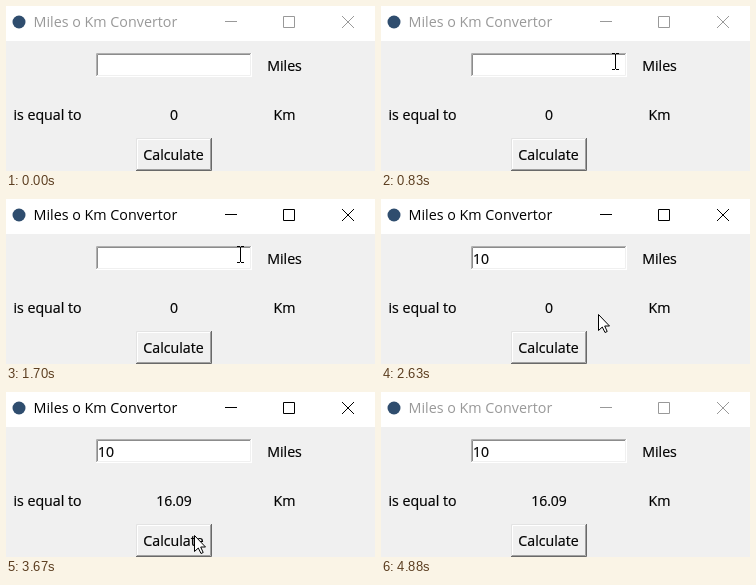
Animation, 369 px wide and 165 px high, one loop 4940 ms. Source, as an HTML page:

```html
<!DOCTYPE html>
<html lang="en">
<head>
<meta charset="utf-8">
<title>Miles to Km</title>
<style>
  html, body { margin: 0; width: 100%; height: 100%; overflow: hidden; background: #f0f0f0; }
  svg { display: block; width: 369px; height: 165px; }
  text { font: 14.2px "Open Sans", "Noto Sans", sans-serif; fill: #000; stroke: #000; stroke-width: .2px; white-space: pre; }
  #title { font-size: 14.3px; stroke: none; }
  .mid { text-anchor: middle; }
  .num { font-size: 14px; }
  .line { fill: none; stroke-width: 1; }
</style>
</head>
<body>
<svg viewBox="0 0 369 165">
  <rect width="369" height="165" fill="#f0f0f0"/>
  <rect width="369" height="35" fill="#fff"/>
  <circle cx="13" cy="16" r="6.5" fill="#2f4d6e"/>
  <text id="title" x="27.5" y="21">Miles o Km Convertor</text>
  <path id="controls" class="line" d="M219 15.5h12M277.5 10.5h11v11h-11zM336 10l12 12M348 10l-12 12"/>

  <rect x="90" y="47" width="156" height="24" fill="#fff"/>
  <g id="entryEdge"></g>
  <text id="entry" class="num" x="92" y="65"></text>
  <rect id="caret" y="49" width="2" height="20"/>

  <text class="mid" x="278.5" y="65">Miles</text>
  <text class="mid" x="41.5" y="114">is equal to</text>
  <text id="result" class="mid num" x="168" y="114"></text>
  <text class="mid" x="278.5" y="114">Km</text>

  <g id="raised"></g>
  <g id="sunken"></g>
  <text id="label" class="mid" x="167.5" y="154">Calculate</text>

  <path id="arrow" d="M.5 .5V16.5L4.3 13L7 18.5L9.2 17.5L6.7 12H11.5Z" fill="#fff" stroke="#000"/>
  <path id="beam" class="line" stroke="#000" d="M-3 -7.5h3M1 -7.5h3M.5 -7v15M-3 8.5h3M1 8.5h3"/>
</svg>
<script>
const LOOP = 4940;
const $ = id => document.getElementById(id);

// Two-pixel bevel: outer and inner colours for the top-left and bottom-right edges.
function bevel(id, x, y, w, h, topLeft, bottomRight) {
  const edge = (inset, color, corner) => {
    const l = x + inset + .5, t = y + inset + .5;
    const r = x + w - inset - .5, b = y + h - inset - .5;
    const d = corner === 'tl' ? `M${l} ${b}V${t}H${r}` : `M${l} ${b}H${r}V${t}`;
    return `<path class="line" stroke-linecap="square" stroke="${color}" d="${d}"/>`;
  };
  $(id).innerHTML = edge(0, topLeft[0], 'tl') + edge(0, bottomRight[0], 'br') +
                    edge(1, topLeft[1], 'tl') + edge(1, bottomRight[1], 'br');
}
const GLOW = ['#e3e3e3', '#fff'], SHADOW = ['#696969', '#a0a0a0'];
bevel('entryEdge', 90, 47, 156, 24, ['#b0b0b0', '#8c8c8c'], ['#fff', '#f0f0f0']);
bevel('raised', 130, 132, 76, 33, GLOW, SHADOW);
bevel('sunken', 130, 132, 76, 33, SHADOW, GLOW);

// Pointer positions, each held until the next: [time, shape, x, y]
const POINTER = [
  [0, ''],
  [70, 'arrow', 337, 150], [140, 'arrow', 331, 105], [210, 'arrow', 320, 60], [280, 'arrow', 306, 22],
  [350, 'arrow', 288, 2], [420, 'arrow', 270, 12], [490, 'arrow', 256, 32], [560, 'arrow', 247, 45],
  [620, 'beam', 242, 50], [690, 'beam', 238, 53], [760, 'beam', 236, 54], [830, 'beam', 234, 55],
  [2490, 'arrow', 232, 82], [2560, 'arrow', 225, 102], [2630, 'arrow', 217, 115], [2700, 'arrow', 213, 119],
  [2770, 'arrow', 209, 122], [2840, 'arrow', 205, 125], [2910, 'arrow', 201, 128], [2980, 'arrow', 197, 130],
  [3050, 'arrow', 191, 138], [3200, 'arrow', 189, 141], [3270, 'arrow', 188, 143],
  [3870, 'arrow', 195, 146], [3940, 'arrow', 212, 152], [4010, 'arrow', 228, 160],
  [4080, '']
];
const CARET = [[1100, 1700], [2030, 2630], [2910, 3540], [3870, 4470], [4800, 4880]];

const within = (t, [from, to]) => t >= from && t < to;
const show = (id, on) => $(id).setAttribute('visibility', on ? 'visible' : 'hidden');

function draw(t) {
  const ink = within(t, [1100, 4880]) ? '#000' : '#999';
  $('title').style.fill = ink;
  $('controls').style.stroke = ink;

  const typed = t < 1840 ? '' : t < 2100 ? '1' : '10';
  $('entry').textContent = typed;
  $('caret').setAttribute('x', 92 + 7.5 * typed.length);
  show('caret', CARET.some(span => within(t, span)));

  const pressed = within(t, [3540, 3670]);
  show('raised', !pressed);
  show('sunken', pressed);
  $('label').setAttribute('transform', pressed ? 'translate(1 1)' : '');
  $('result').textContent = t < 3670 ? '0' : '16.09';

  const [, shape, x, y] = POINTER.findLast(([start]) => start <= t);
  for (const id of ['arrow', 'beam']) {
    show(id, id === shape);
    if (id === shape) $(id).setAttribute('transform', `translate(${x} ${y})`);
  }
}

const start = performance.now();
function tick() {
  draw((performance.now() - start) % LOOP);
  requestAnimationFrame(tick);
}
tick();
</script>
</body>
</html>
```
